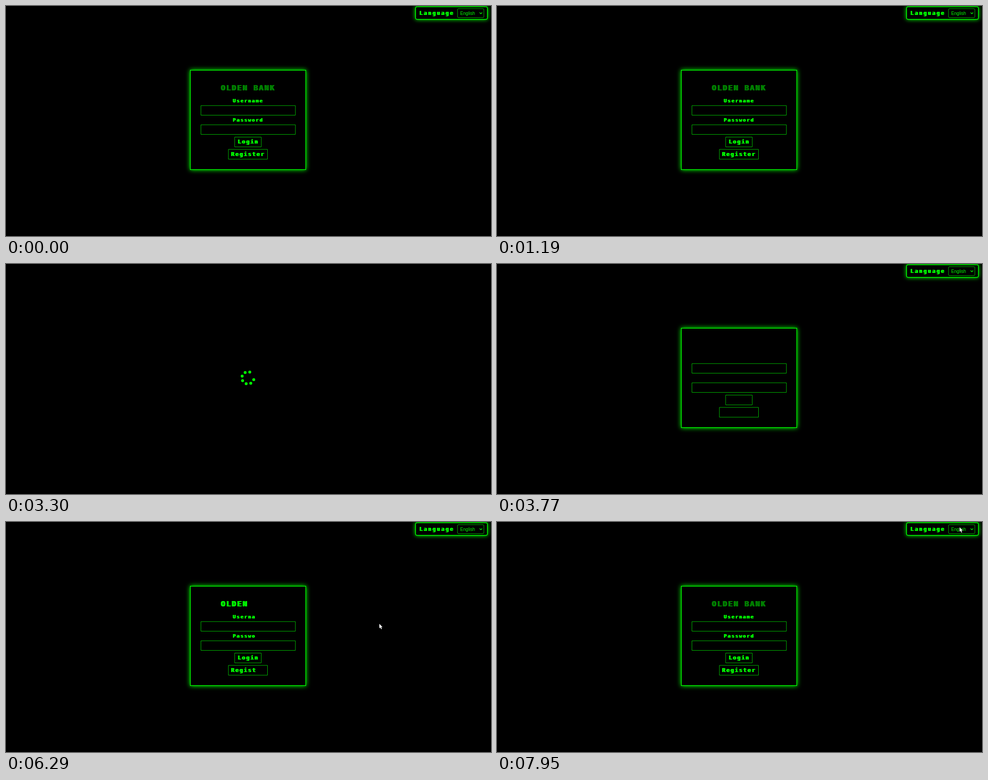
An HTML page with a canvas for the animation above (8000 ms loop, 1086 px wide and 515 px high).

```html
<!DOCTYPE html>
<html lang="en">
<head>
<meta charset="utf-8">
<title>Login terminal</title>
<style>
  html, body { margin: 0; width: 100%; height: 100%; overflow: hidden; background: #000; }
  canvas { display: block; }
</style>
</head>
<body>
<canvas id="stage" width="1086" height="515"></canvas>
<script>
const ctx = document.getElementById('stage').getContext('2d');
const LOOP = 8000, RELOAD = 3170, READY = 3770, TYPE_START = 5430, TYPE_STEP = 160;
const LIME = '#00ff00', DARK = '#008000', LINE = '#00c400';

const labels = [
  { text: 'Username', x: 507, y: 216, cell: 8.55, size: 11 },
  { text: 'Password', x: 507, y: 259, cell: 8.55, size: 11 },
  { text: 'Login', x: 518, y: 308, cell: 9.4, size: 12.5 },
  { text: 'Register', x: 503, y: 336, cell: 9.5, size: 12.5 }
];
const title = { text: 'OLDEN BANK', x: 480, y: 189, cell: 12.2, size: 16.4 };
const language = { text: 'Language', x: 924.5, y: 19.5, cell: 9.75, size: 12 };

// Pointer stops as [time, x, y]; the pointer is hidden outside each path.
const pointerPaths = [
  [[590, 914, 444], [660, 840, 360], [730, 740, 262], [790, 696, 231],
   [990, 696, 231], [1060, 640, 170], [1185, 560, 98]],
  [[4100, 422, 100], [4170, 450, 121], [4400, 450, 121], [4500, 540, 95],
   [4630, 697, 105], [4840, 697, 105], [4900, 747, 104], [4960, 1003, 251],
   [5430, 1003, 251], [6100, 836, 228], [6850, 836, 228], [7680, 1029, 10],
   [8000, 1037, 12]]
];

// Wide terminal lettering: one cell per letter, stems thickened sideways.
function terminalText({ text, x, y, cell, size }, color, count = text.length) {
  ctx.font = `bold ${size}px "DejaVu Sans Mono", monospace`;
  ctx.textAlign = 'center';
  ctx.fillStyle = color;
  const smear = size * 0.06;
  [...text].slice(0, Math.max(0, count)).forEach((letter, i) => {
    const center = x + (i + 0.5) * cell;
    ctx.fillText(letter, center - smear, y);
    ctx.fillText(letter, center + smear, y);
  });
}

function frame(x, y, w, h, color = LINE, radius = 0) {
  ctx.strokeStyle = color;
  ctx.lineWidth = 1;
  ctx.beginPath();
  ctx.roundRect(x + 0.5, y + 0.5, w - 1, h - 1, radius);
  ctx.stroke();
}

function glowPanel(x, y, w, h, border, radius) {
  ctx.save();
  ctx.shadowColor = LIME;
  ctx.shadowBlur = 10;
  ctx.fillStyle = LIME;
  ctx.beginPath();
  ctx.roundRect(x, y, w, h, radius);
  ctx.fill();
  ctx.restore();
  ctx.fillStyle = '#000';
  ctx.beginPath();
  ctx.roundRect(x + border, y + border, w - 2 * border, h - 2 * border, Math.max(0, radius - border));
  ctx.fill();
}

function languageBar() {
  glowPanel(916.5, 1, 162, 29.5, 1.5, 4);
  terminalText(language, LIME);
  frame(1010.5, 5.5, 60, 21, LINE, 2);
  ctx.font = '10.1px "Liberation Sans", Arial, sans-serif';
  ctx.textAlign = 'left';
  ctx.fillStyle = LIME;
  ctx.fillText('English', 1017, 19.5);
  ctx.strokeStyle = LIME;
  ctx.lineWidth = 1.4;
  ctx.beginPath();
  ctx.moveTo(1060.5, 14.5);
  ctx.lineTo(1063.3, 17.5);
  ctx.lineTo(1066.1, 14.5);
  ctx.stroke();
}

function titleColor(t) {
  const phase = t < RELOAD ? (t - 190) / 198.6 : (t - 6168) / 198;
  return Math.floor(phase) % 2 === 0 ? LIME : DARK;
}

function loginPage(t) {
  languageBar();
  glowPanel(412, 143, 260, 224, 1.5, 0);
  frame(436, 222.5, 212.5, 22.5);
  frame(436, 265.5, 212.5, 22.5);
  frame(511.5, 293, 60.5, 23);
  frame(497.5, 320.5, 88.5, 23);
  const typed = t < RELOAD ? Infinity : Math.floor((t - TYPE_START) / TYPE_STEP) + 1;
  terminalText(title, titleColor(t), typed);
  labels.forEach(label => terminalText(label, LIME, typed));
}

function spinner(t) {
  const turn = (t - 3300) / 1000 * Math.PI * 2 + 17 * Math.PI / 180;
  ctx.fillStyle = LIME;
  for (let i = 0; i < 7; i++) {
    const angle = turn + i * Math.PI / 4;
    ctx.beginPath();
    ctx.arc(541.8 + 13.6 * Math.cos(angle), 255 + 13.6 * Math.sin(angle), 3.2, 0, Math.PI * 2);
    ctx.fill();
  }
}

function pointer(t) {
  const path = pointerPaths.find(p => t >= p[0][0] && t < p[p.length - 1][0]);
  if (!path) return;
  const next = path.findIndex(stop => stop[0] > t);
  const [t0, x0, y0] = path[next - 1], [t1, x1, y1] = path[next];
  const k = (t - t0) / (t1 - t0);
  ctx.save();
  ctx.translate(x0 + (x1 - x0) * k, y0 + (y1 - y0) * k);
  const shape = new Path2D('M0 0V10L2.3 8L4 12L5.7 11.3L4 7.6L7 7.3Z');
  ctx.strokeStyle = '#000';
  ctx.lineWidth = 1.2;
  ctx.stroke(shape);
  ctx.fillStyle = '#fff';
  ctx.fill(shape);
  ctx.restore();
}

function draw() {
  const t = performance.now() % LOOP;
  ctx.fillStyle = '#000';
  ctx.fillRect(0, 0, 1086, 515);
  if (t >= RELOAD && t < READY) spinner(t);
  else loginPage(t);
  pointer(t);
  requestAnimationFrame(draw);
}
draw();
</script>
</body>
</html>
```
